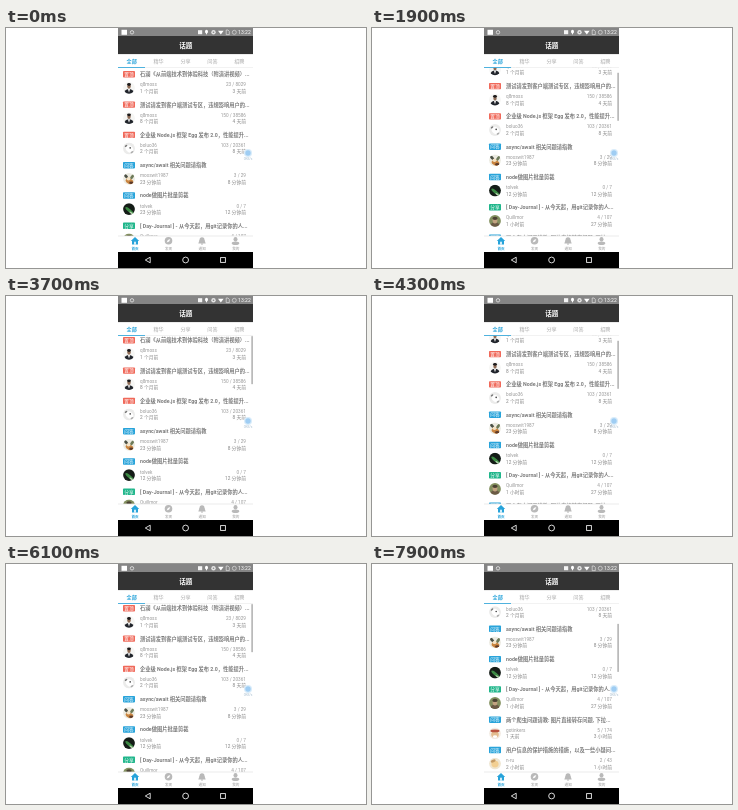
These frames come from a looping animation (360x240 px, 8000 ms). An HTML page with a canvas:

```html
<!DOCTYPE html>
<html lang="zh-CN">
<head>
<meta charset="utf-8">
<title>话题</title>
<style>
html, body { margin: 0; width: 100%; height: 100%; overflow: hidden; background: #fff; }
canvas { display: block; width: 360px; height: 240px; }
</style>
</head>
<body>
<canvas id="stage"></canvas>
<script>
const W = 360, H = 240, LOOP = 8000, CYCLE = 2400;
const canvas = document.getElementById('stage');
const ctx = canvas.getContext('2d');
const dpr = window.devicePixelRatio || 1;
canvas.width = W * dpr;
canvas.height = H * dpr;

const FONT = 'Roboto, "Noto Sans CJK SC", "Noto Sans CJK", sans-serif';
const RED = '#f0695a', BLUE = '#27a3da', GREEN = '#20b68b';

const posts = [
  ['置顶', RED, '石澜《从前端技术到体验科技（附演讲视频）...', 'q8moss', '23 / 8029', '1 个月前', '3 天前', suit],
  ['置顶', RED, '测试请发到客户端测试专区，违规影响用户的...', 'q8moss', '150 / 38586', '8 个月前', '4 天前', suit],
  ['置顶', RED, '企业级 Node.js 框架 Egg 发布 2.0，性能提升...', 'boluo36', '103 / 20361', '2 个月前', '8 天前', sketch],
  ['问答', BLUE, 'async/await 相关问题请指教', 'mosswit1987', '3 / 29', '23 分钟前', '8 分钟前', fighter],
  ['问答', BLUE, 'node做图片批量剪裁', 'tolvek', '0 / 7', '12 分钟前', '12 分钟前', leaf],
  ['分享', GREEN, '[ Day-Journal ] - 从今天起，用git记录你的人...', 'Quillmor', '4 / 107', '1 小时前', '27 分钟前', portrait],
  ['问答', BLUE, '两个爬虫问题请教: 图片直接转存问题, 下拉...', 'gotinkers', '5 / 174', '1 天前', '3 小时前', mascot],
  ['问答', BLUE, '用户信息的保护措施的措施，以及一些小疑问...', 'n-ru', '2 / 43', '2 小时前', '1 小时前', pale]
];

function rect(x, y, w, h, color) {
  ctx.fillStyle = color;
  ctx.fillRect(x, y, w, h);
}

function oval(x, y, rx, ry, color, turn = 0) {
  ctx.fillStyle = color;
  ctx.beginPath();
  ctx.ellipse(x, y, rx, ry, turn, 0, Math.PI * 2);
  ctx.fill();
}

function ring(x, y, r, color, width) {
  ctx.strokeStyle = color;
  ctx.lineWidth = width;
  ctx.beginPath();
  ctx.arc(x, y, r, 0, Math.PI * 2);
  ctx.stroke();
}

function poly(points, color, width) {
  ctx.beginPath();
  points.forEach(([x, y]) => ctx.lineTo(x, y));
  ctx.closePath();
  if (width) {
    ctx.strokeStyle = color;
    ctx.lineWidth = width;
    ctx.stroke();
  } else {
    ctx.fillStyle = color;
    ctx.fill();
  }
}

function text(str, x, y, size, color, align = 'left', weight = 400) {
  ctx.font = `${weight} ${size}px ${FONT}`;
  ctx.textAlign = align;
  ctx.textBaseline = 'alphabetic';
  ctx.fillStyle = color;
  ctx.fillText(str, x, y + size * 0.37);
}

// Avatars, drawn around (0, 0) inside a circle of radius 6
function suit() {
  rect(-6, -6, 12, 12, '#f6f6f4');
  oval(0, 5.6, 4.8, 4.6, '#20242b');
  poly([[-1.2, 1], [1.2, 1], [0, 4.5]], '#eee');
  oval(0, -1.6, 1.7, 2.5, '#8f6c56');
  oval(0, -3.4, 1.9, 1.4, '#1d1b1c');
}

function sketch() {
  rect(-6, -6, 12, 12, '#ebebea');
  oval(0.5, 0.5, 4, 3.2, '#fff', 0.7);
  oval(-3, -2.6, 1.5, 0.8, '#777', -0.7);
  oval(1.2, -0.6, 0.9, 0.8, '#555');
  oval(3, 3.6, 1.6, 0.8, '#aaa', -0.6);
}

function fighter() {
  rect(-6, -6, 12, 12, '#ecebe2');
  oval(-3, -2.5, 2.8, 1.4, '#4c5146', 0.8);
  oval(3.2, -2, 1.4, 3, '#6d7a58', 0.6);
  oval(0.5, 2.6, 4, 2.6, '#c9843f', 0.4);
  oval(-0.5, 0, 2, 1.7, '#f4e2c4');
  oval(2.2, 4, 2, 1.2, '#5c3a2a');
}

function leaf() {
  rect(-6, -6, 12, 12, '#141c17');
  oval(0.5, 1.5, 5.2, 1.5, '#3d8a44', 0.7);
  oval(2.5, 4, 2.4, 0.8, '#b6d3ae', 0.6);
}

function portrait() {
  rect(-6, -6, 12, 12, '#83905f');
  oval(0, 5, 4.4, 3.6, '#6b5a45');
  oval(0, -0.4, 2.4, 2.9, '#c2a381');
  oval(0, -2.6, 2.6, 1.6, '#4a4132');
}

function mascot() {
  rect(-6, -6, 12, 12, '#f3ece4');
  oval(0, 1.2, 3.8, 3.2, '#e3bd90');
  oval(0, -2.4, 4.6, 1.4, '#b8523f');
  oval(0, 3.4, 2.2, 1.4, '#fff');
}

function pale() {
  rect(-6, -6, 12, 12, '#efe6d2');
  oval(0, 0.5, 3.6, 3.4, '#f2cf92');
  oval(-1.8, -2.6, 2.6, 1.4, '#c49a64', -0.4);
}

function drawPost(post, y, age) {
  const [tag, color, title, user, count, , active, avatar] = post;
  ctx.fillStyle = color;
  ctx.beginPath();
  ctx.roundRect(117, y - 3.2, 12, 6.4, 0.8);
  ctx.fill();
  text(tag, 123, y, 4.7, '#fff', 'center', 500);
  text(title, 134, y, 5.25, '#7c7c7c', 'left', 700);

  ctx.save();
  ctx.translate(123, y + 13.6);
  ctx.beginPath();
  ctx.arc(0, 0, 5.9, 0, Math.PI * 2);
  ctx.clip();
  avatar();
  ctx.restore();

  text(user, 134, y + 10.3, 4.7, '#999');
  text(count, 240, y + 10.3, 4.7, '#999', 'right');
  text(age, 134, y + 16.8, 4.8, '#888');
  text(active, 240, y + 16.8, 4.8, '#888', 'right');
}

function drawStatus() {
  rect(112, 0, 135, 8, '#858585');
  rect(115.5, 1.8, 5.5, 5, '#fff');
  ring(126, 4.3, 1.7, '#ddd', 0.9);
  rect(192, 2.2, 4.2, 4, '#f4f4f4');
  oval(200.5, 3.5, 1.5, 1.7, '#fff');
  poly([[199.3, 4.3], [201.7, 4.3], [200.5, 6.8]], '#fff');
  oval(207.5, 4.3, 2.2, 2.2, '#e4e4e4');
  oval(207.5, 4.3, 0.8, 0.8, '#858585');
  poly([[212, 2.8], [217.6, 2.8], [214.8, 6.6]], '#fff');
  poly([[220.2, 2], [222, 2], [223.3, 3.4], [223.3, 6.6], [220.2, 6.6]], '#eee', 0.6);
  ring(228.3, 4.3, 2, '#ddd', 0.7);
  text('13:22', 244.8, 4.5, 5.1, '#fff', 'right');
}

function drawHeader() {
  rect(112, 8, 135, 18.3, '#333');
  text('话题', 179.8, 17.4, 6.6, '#fff', 'center', 700);
  rect(112, 26.3, 135, 13.2, '#fff');
  ['全部', '精华', '分享', '问答', '招聘'].forEach((name, i) =>
    text(name, 125.7 + i * 26.9, 33.3, 5.1, i ? '#aaa' : BLUE, 'center', i ? 400 : 700));
  rect(112, 39, 135, 0.5, '#e4e4e4');
  rect(112, 39, 27, 0.8, BLUE);
}

function drawTabs() {
  rect(112, 207.8, 135, 16.2, '#fff');
  rect(112, 207.8, 135, 0.4, '#ccc');
  poly([[124.8, 213], [129, 209], [133.2, 213], [132, 213], [132, 216.6], [126, 216.6], [126, 213]], BLUE);
  rect(128.2, 213.7, 1.6, 2.9, '#fff');

  const grey = '#b9b9b9';
  oval(162.5, 212.8, 3.8, 3.8, grey);
  poly([[164.3, 211], [163.2, 213.5], [160.7, 214.6], [161.8, 212.1]], '#fff');
  oval(196, 212, 2.5, 2.8, grey);
  poly([[193.5, 212], [198.5, 212], [199.7, 215.5], [192.3, 215.5]], grey);
  oval(196, 216, 1, 0.8, grey);
  oval(229.5, 211.2, 2, 2.2, grey);
  oval(229.5, 215.3, 3.8, 1.8, grey);

  ['首页', '发现', '通知', '我的'].forEach((name, i) =>
    text(name, 129 + i * 33.6, 220.2, 3.6, i ? '#999' : BLUE, 'center', i ? 400 : 700));
}

function drawNav() {
  rect(112, 224, 135, 16, '#000');
  poly([[139.3, 232], [144.2, 229.2], [144.2, 234.8]], '#eee', 0.9);
  ring(179.6, 232, 2.9, '#eee', 0.9);
  ctx.strokeStyle = '#eee';
  ctx.lineWidth = 0.9;
  ctx.strokeRect(214.6, 229.6, 4.8, 4.8);
}

function drawFloat() {
  oval(242, 125, 4, 4, '#d9ecfa');
  oval(242, 125, 2.7, 2.7, '#9fcdf3');
  text('0KB/s', 242, 131.2, 3.2, '#a9bfd0', 'center');
}

function scrollAt(t) {
  if (t >= 7700) return 45.4 + (t - 7700) * 0.135;
  if (t >= 7200) return 32;
  const p = t % CYCLE;
  return p < 1300 ? 0 : 2 + (p - 1300) * 0.0275;
}

function draw(now) {
  const t = Math.floor(now % LOOP / 100) * 100;
  const scroll = scrollAt(t);
  const early = t < 7200 && t % CYCLE < 800;
  ctx.setTransform(dpr, 0, 0, dpr, 0, 0);
  rect(0, 0, W, H, '#fff');

  ctx.save();
  ctx.beginPath();
  ctx.rect(112, 39.5, 135, 168.5);
  ctx.clip();
  posts.forEach((post, i) =>
    drawPost(post, 46.3 + i * 30.3 - scroll, i === 4 && early ? '23 分钟前' : post[5]));
  if (scroll) rect(245.4, 39.6 + scroll * 0.28, 1.4, 48, '#aaa');
  ctx.restore();

  drawStatus();
  drawHeader();
  drawTabs();
  drawNav();
  drawFloat();
}

const start = performance.now();
function tick() {
  draw(performance.now() - start);
  requestAnimationFrame(tick);
}
tick();
</script>
</body>
</html>
```
